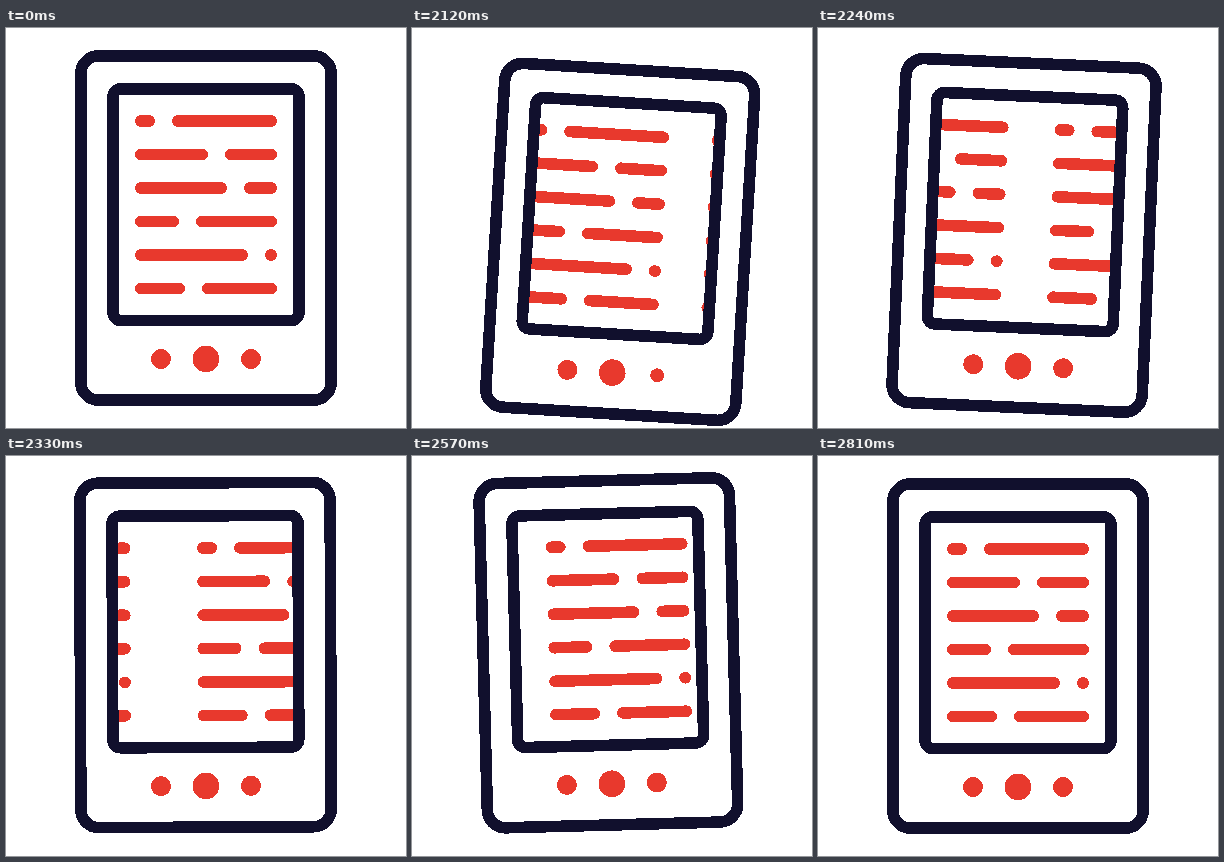
Animation, 400 px wide and 400 px high, one loop 2840 ms. Source, as an HTML page:

```html
<!DOCTYPE html>
<html lang="en">
<head>
<meta charset="utf-8">
<title>E-reader page turn</title>
<style>
  html, body { margin: 0; width: 100%; height: 100%; overflow: hidden; background: #fff; }
  svg { display: block; width: 100vw; height: 100vh; shape-rendering: crispEdges; }
  .frame { fill: none; stroke: #11102d; stroke-width: 11.6; }
  .lines { fill: none; stroke: #e8392d; stroke-width: 11.6; stroke-linecap: round; }
  .button { fill: #e8392d; }
</style>
</head>
<body>
<svg viewBox="0 0 400 400">
  <clipPath id="screen"><rect x="108" y="61" width="184" height="231"/></clipPath>
  <g id="device">
    <g clip-path="url(#screen)">
      <path id="oldPage" class="lines"/>
      <path id="newPage" class="lines"/>
    </g>
    <rect class="frame" x="74.8" y="27.8" width="250.4" height="344.4" rx="18"/>
    <rect class="frame" x="107" y="60.8" width="186" height="231.7" rx="8"/>
    <circle class="button" cx="155" cy="331" r="10"/>
    <circle class="button" cx="200" cy="331" r="13.3"/>
    <circle id="next" class="button" cx="245" cy="331" r="10"/>
  </g>
</svg>
<script>
  const LOOP = 2840, STEP = 30, START = 2030, END = 26;
  const el = id => document.getElementById(id);
  const device = el('device'), oldPage = el('oldPage'), newPage = el('newPage'), next = el('next');

  // Each row is two strokes; the value is where the first one ends.
  const text = [149, 202, 221, 173, 242, 179].map((end, i) => {
    const y = 93 + 33.5 * i;
    return `M134.8 ${y}H${end - 5.8}M${end + 22.8} ${y}H265.2`;
  }).join('');
  oldPage.setAttribute('d', text);
  newPage.setAttribute('d', text);

  const progress = (k, from, to) => Math.min(1, Math.max(0, (k - from) / (to - from)));
  const ease = (k, from, to) => (1 - Math.cos(Math.PI * progress(k, from, to))) / 2;
  const slide = (node, x) => node.setAttribute('transform', `translate(${x} 0)`);

  function draw(now) {
    const t = now % LOOP;
    const k = t < START ? -2 : Math.floor((t - START) / STEP);

    // The press knocks the device over, it rebounds past upright, then settles.
    const tilt = 3.85 * ease(k, -1.2, 4) - 5.95 * ease(k, 4, 13.7) + 2.1 * ease(k, 13.7, END);
    const drop = 13.6 * ease(k, -1.5, 3) - 18.4 * ease(k, 3, 13) + 4.8 * ease(k, 13, END);
    device.setAttribute('transform', `translate(0 ${drop}) rotate(${tilt} 200 335)`);

    slide(oldPage, -228 * ease(k, -1.5, 18));
    slide(newPage, 233 * (1 - progress(k, -1, END)) ** 2.5);
    next.setAttribute('r', 10 - 3.5 * Math.sin(Math.PI * progress(k, -1, 5)));
    requestAnimationFrame(draw);
  }
  draw(0);
</script>
</body>
</html>
```
